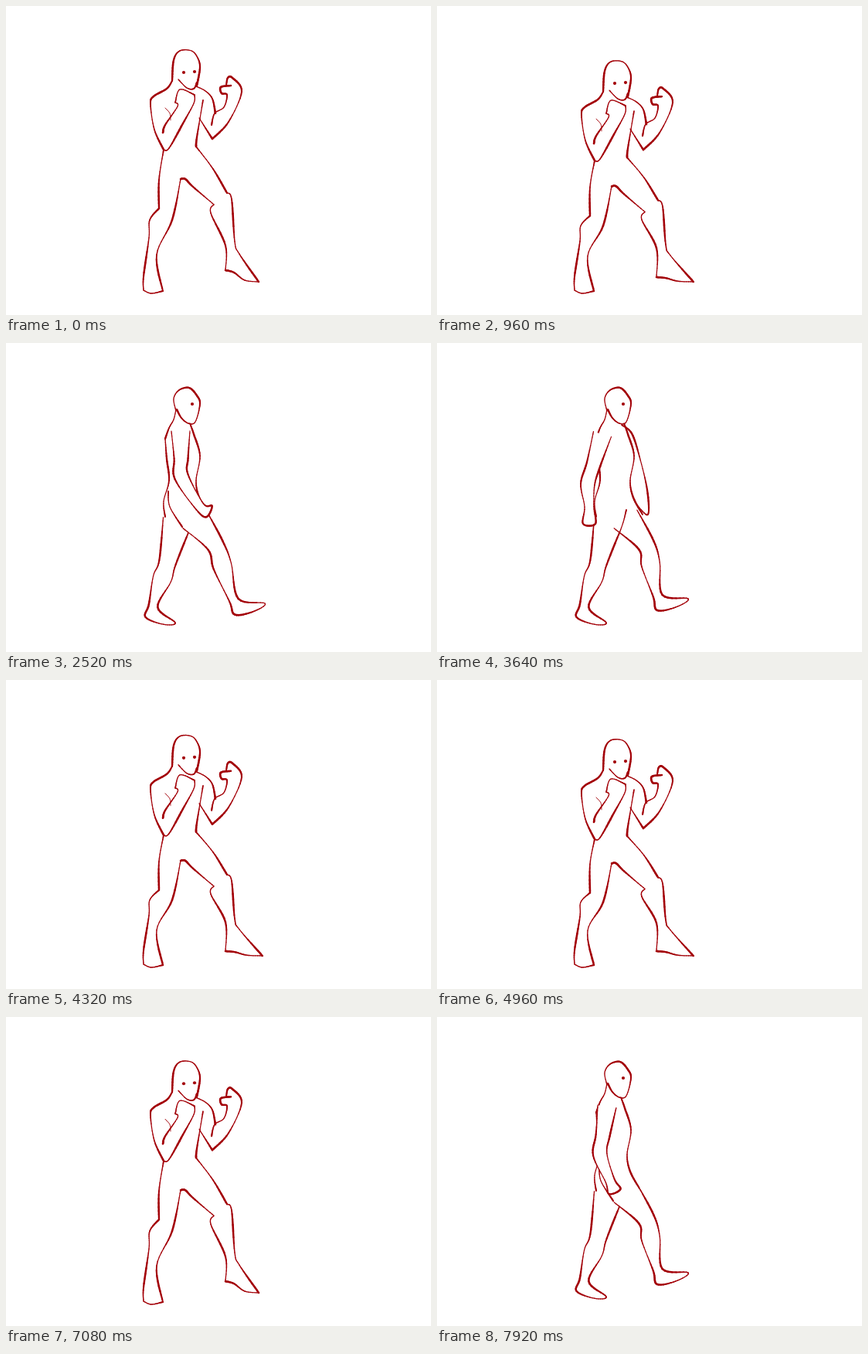
These frames come from a looping animation (550x400 px, 8 s). An HTML page with a canvas:

```html
<!DOCTYPE html>
<html lang="en">
<head>
<meta charset="utf-8">
<title>Figure study</title>
<style>
html, body { margin: 0; width: 100%; height: 100%; overflow: hidden; background: #fff; }
canvas { display: block; width: 550px; height: 400px; }
</style>
</head>
<body>
<canvas id="stage" width="550" height="400"></canvas>
<script>
const ctx = document.getElementById('stage').getContext('2d');
const INK = '#a30008';
const LOOP = 8000;

// ---- geometry ----
const pts = s => s.split(' ').map(p => p.split(',').map(Number));
const strokes = s => s.split(' / ').map(pts);
const lerp = (a, b, u) => [a[0] + (b[0] - a[0]) * u, a[1] + (b[1] - a[1]) * u];
const mix = (a, b, u) => a.map((p, i) => lerp(p, b[i], u));
const ramp = (v, a, b) => Math.min(1, Math.max(0, (v - a) / (b - a)));
const unit = (a, b) => {
  const d = Math.hypot(b[0] - a[0], b[1] - a[1]) || 1;
  return [(b[0] - a[0]) / d, (b[1] - a[1]) / d];
};

// Both sides of a limb, offset from its bones by half widths
function limb(bones, widths) {
  const side = sign => bones.map((p, i) => {
    const [dx, dy] = unit(bones[Math.max(i - 1, 0)], bones[Math.min(i + 1, bones.length - 1)]);
    return [p[0] + sign * dy * widths[i], p[1] - sign * dx * widths[i]];
  });
  return { front: side(1), back: side(-1).reverse() };
}

function legOutline([hip, knee, ankle, toe]) {
  const { front, back } = limb([hip, knee, lerp(knee, ankle, 0.35), lerp(knee, ankle, 0.92)], [19, 11, 12, 6]);
  const shin = unit(knee, ankle), foot = unit(ankle, toe);
  const heel = [0, 1].map(k => ankle[k] + shin[k] * 13 - foot[k] * 5);
  const [mx, my] = lerp(heel, toe, 0.6);
  return [...front, toe, [mx, my + 5], heel, ...back];
}

// Arm position follows one swing value: -1 behind, 0 down, 1 forward
function armOutline(s) {
  const shoulder = [220 + 6 * s, 116 - 2 * s], elbow = [211 + 16 * s, 178 - 5 * s];
  const wrist = [224 + 27 * s, 212], hand = [230 + 33 * s, 226 - 8 * s];
  const { front, back } = limb([shoulder, lerp(shoulder, elbow, 0.6), elbow, wrist, hand], [12, 9, 9, 6, 8]);
  return [...back.reverse(), ...front.reverse()];
}

// ---- brush ----
function curve(p) {
  const out = [p[0]];
  for (let i = 0; i < p.length - 1; i++) {
    const a = p[Math.max(i - 1, 0)], b = p[i], c = p[i + 1], d = p[Math.min(i + 2, p.length - 1)];
    for (let n = 1; n <= 8; n++) {
      const u = n / 8;
      out.push([0, 1].map(k => b[k] + 0.5 * u * (c[k] - a[k] +
        u * (2 * a[k] - 5 * b[k] + 4 * c[k] - d[k] + u * (3 * (b[k] - c[k]) + d[k] - a[k])))));
    }
  }
  return out;
}

// Ink line whose weight swells along its length
function brush(p, weight, filled) {
  const c = curve(p);
  if (filled) {
    ctx.fillStyle = '#fff';
    ctx.beginPath();
    c.forEach(q => ctx.lineTo(...q));
    ctx.fill();
  }
  ctx.strokeStyle = INK;
  ctx.lineCap = 'round';
  let s = 0;
  for (let i = 1; i < c.length; i++) {
    s += Math.hypot(c[i][0] - c[i - 1][0], c[i][1] - c[i - 1][1]);
    ctx.lineWidth = weight * (1 + 0.36 * Math.sin(s / 13 + p.length));
    ctx.beginPath();
    ctx.moveTo(...c[i - 1]);
    ctx.lineTo(...c[i]);
    ctx.stroke();
  }
}

function dot([x, y]) {
  ctx.fillStyle = INK;
  ctx.beginPath();
  ctx.arc(x, y, 2.1, 0, 7);
  ctx.fill();
}

// ---- fighting stance ----
const guard = {
  head: strokes('247,103 251,80 248,67 240,58 225,58 217,70 215,97 / 223,95 234,106 243,107 247,99'),
  arms: strokes('215,97 208,107 191,117 187,127 192,160 204,186 / 204,186 211,184 229,152 243,126 244,115 / ' +
    '244,115 225,108 219,125 / 219,125 222,130 206,154 203,164 / 246,104 258,110 267,120 271,139 / ' +
    '285,103 287,93 293,93 305,111 288,150 267,172 / 267,172 250,145 / ' +
    '291,103 278,105 279,113 286,115 282,131 270,139 266,154'),
  body: strokes('255,122 247,170 246,182 / 246,182 268,211 286,242 / 204,186 198,225 198,262'),
  legs: strokes('286,242 292,250 296,305 302,321 327,357 / 327,357 309,355 295,345 284,342 / ' +
    '284,342 284,310 265,268 269,257 / 269,257 242,234 232,224 226,224 / ' +
    '226,224 215,277 195,322 203,369 / 203,369 188,372 178,368 / 178,368 178,350 185,300 186,277 198,262'),
  eyes: pts('230,86 244,85')
};

// Knees bend: the upper body drops, the feet stay, the front foot flattens
function sink(d) {
  const flat = Math.min(1, d / 14);
  return ([x, y]) => x > 280 && y > 330
    ? [x + flat * (x - 284) / 9, y + 0.6 * flat * (357 - y)]
    : [x, y + d * (1 - 0.33 * ramp(y, 192, 224) - 0.67 * ramp(y, 262, 335))];
}

function drawGuard(ms) {
  const u = (ms % 700) / 700;
  const bend = sink(11 * (1 - Math.cos(2 * Math.PI * u ** 1.23)));
  [guard.head, guard.arms, guard.body, guard.legs].flat().forEach(l => brush(l.map(bend), 1.9));
  brush(pts('206,132 212,139 213,148').map(bend), 0.8);
  guard.eyes.map(bend).forEach(dot);
}

// ---- walk ----
// Leg poses: hip, knee, ankle, toe
const leg = {
  front: pts('244,228 271,262 287,333 325,331'),
  planted: pts('236,228 243,285 238,348 272,362'),
  back: pts('222,230 209,284 189,345 219,362'),
  lifted: pts('228,230 228,290 182,325 168,345'),
  passing: pts('242,228 262,272 242,330 272,340')
};
const torso = {
  head: pts('220,88 217,72 224,61 237,58 247,68 251,79 245,102 236,104 227,97 221,86'),
  nape: pts('220,86 217,99 211,110 206,124'),
  spine: pts('206,124 208,150 211,178 204,205 206,225'),
  chest: pts('238,104 243,118 251,146 246,178 250,200 262,222'),
  farArm: pts('239,106 252,117 262,147 272,190 273,222 259,210'),
  seat: pts('210,192 212,212 228,238'),
  groin: pts('245,216 241,232 235,249')
};
const STEP = 7;

// Follow [time, pose] keys in a straight line
function pose(keys, u) {
  const i = keys.findIndex(k => k[0] >= u) || 1;
  const [t0, a] = keys[i - 1], [t1, b] = keys[i];
  return mix(a, b, (u - t0) / (t1 - t0));
}

function drawWalk(n) {
  const u = (n % STEP) / STEP;
  const tri = Math.abs((n / STEP) % 4 - 2);
  const swing = 1 - tri, turn = Math.max(0, -swing), reach = Math.max(0, swing);
  const front = leg.front.map(([x, y], i) => i < 2 ? [x, y] : [x + 10 * reach, y + 6 * reach]);

  const legs = [
    pose([[0, front], [0.5, leg.planted], [1, leg.back]], u),
    pose([[0, leg.back], [0.35, leg.lifted], [0.7, leg.passing], [1, front]], u)
  ];
  legs.sort((a, b) => a[1][0] - b[1][0]).forEach(l => brush(legOutline(l), 1.9, true));

  const chest = torso.chest.map(([x, y]) => [x + 4 * turn, y]);
  if (turn) brush(mix(chest, torso.farArm, turn), 1.8);
  [chest, torso.spine, torso.nape, mix(torso.seat, torso.groin, turn)].forEach(l => brush(l, 1.8));
  brush(armOutline(swing), 1.8, true);
  brush(torso.head, 1.8);
  dot([241, 79]);
}

// ---- lying ----
const lying = strokes(
  '121,312 100,302 80,303 70,315 80,333 104,339 124,336 / 121,312 136,306 / ' +
  '136,307 155,293 180,285 211,288 / 211,288 270,265 325,256 / 325,256 347,284 371,312 411,338 / ' +
  '124,336 150,336 172,344 187,339 215,343 268,340 291,337 300,342 / 265,325 282,323 294,328 301,342 / ' +
  '152,311 185,310 193,321 / 193,321 203,316 218,322 / 218,322 240,315 283,331 / ' +
  '258,319 270,318 288,302 316,274 / 316,274 322,296 353,309 362,337 / 288,302 322,294 / ' +
  '280,331 345,322 362,334 / 364,304 400,320 417,326 426,316 433,297 / ' +
  '433,297 435,325 430,340 412,340 / 363,338 411,337');

function drawLying() {
  lying.forEach(l => brush(l, 2.3));
  pts('95,312 93,327').forEach(dot);
}

function drawRest() {
  ctx.save();
  ctx.transform(1.03, 0, 0, 1, -2, 0);
  drawLying();
  ctx.restore();
}

// ---- fall ----
function turned(deg, x, y, shift, draw) {
  ctx.save();
  ctx.translate(x + shift, y);
  ctx.rotate(deg * Math.PI / 180);
  ctx.translate(-x, -y);
  draw();
  ctx.restore();
}

function drawFall(n) {
  if (n < 2) turned(-17 - 22 * n, 260, 368, 25 + 30 * n, () => drawGuard(0));
  else turned(40 - 15 * (n - 2), 412, 340, 0, drawLying);
}

// ---- timeline ----
const guardAt = ms => drawGuard(Math.floor(ms / 40) * 40);
const scenes = [
  [0, guardAt],
  [1400, ms => drawWalk(Math.floor(ms / 80))],
  [3800, guardAt],
  [5360, ms => drawFall(Math.floor(ms / 80))],
  [5760, drawRest],
  [6360, drawLying],
  [6400, guardAt],
  [7440, ms => drawWalk(Math.floor(ms / 80) + 1)]
];

function render(ms) {
  ctx.fillStyle = '#fff';
  ctx.fillRect(0, 0, 550, 400);
  const [start, draw] = scenes.filter(s => s[0] <= ms).pop();
  draw(ms - start);
}

const began = performance.now();
function tick() {
  render((performance.now() - began) % LOOP);
  requestAnimationFrame(tick);
}
tick();
</script>
</body>
</html>
```
